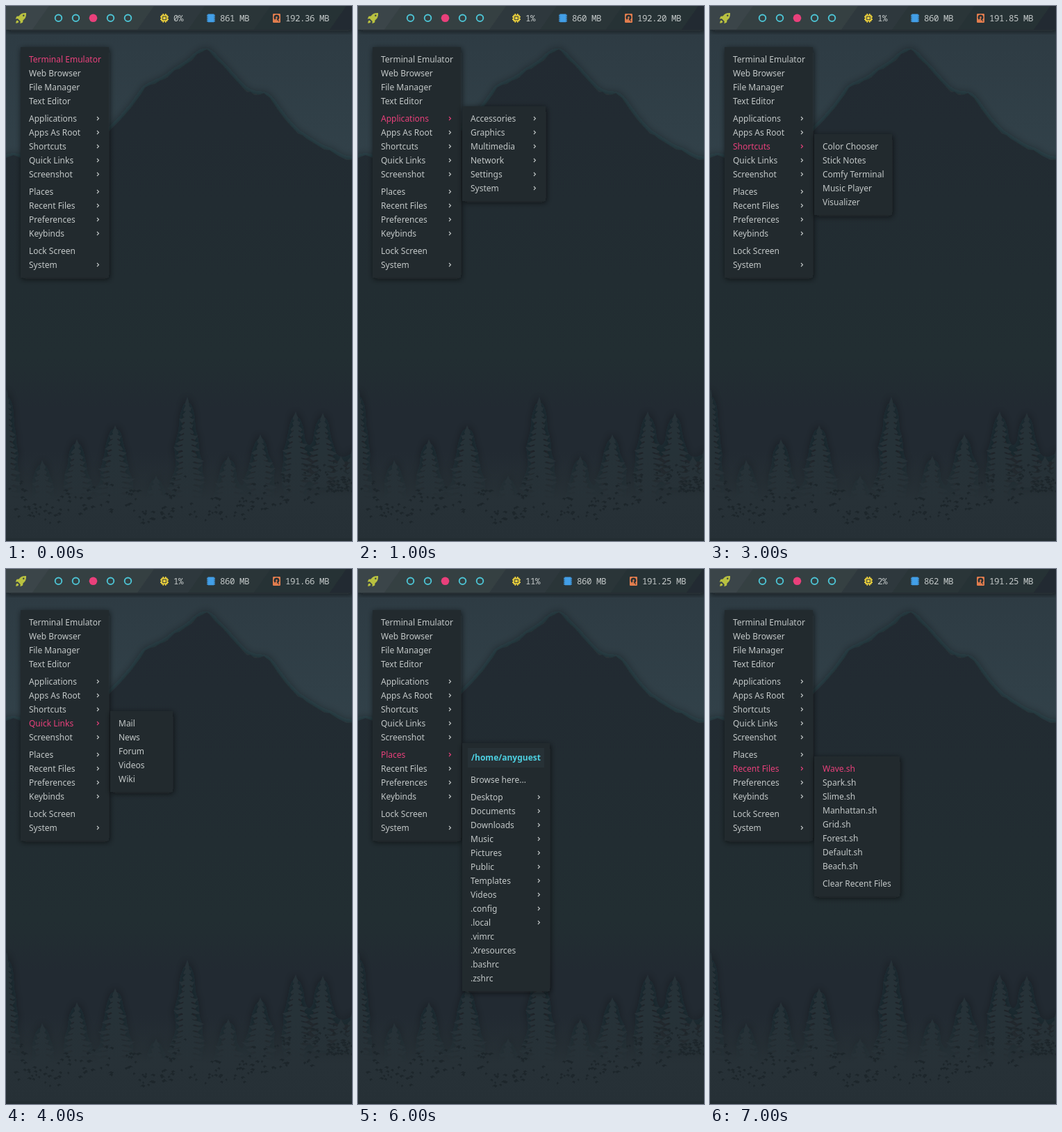
An HTML page for the animation above (8000 ms loop, 498 px wide and 768 px high).

```html
<!DOCTYPE html>
<html lang="en">
<head>
<meta charset="utf-8">
<title>Desktop menu</title>
<style>
  html, body { margin: 0; width: 100%; height: 100%; overflow: hidden; background: #232d32; }
  svg { display: block; }
  text { white-space: pre; }
  .menu { font: 12px "Noto Sans", sans-serif; fill: #c3c8c8; }
  .bar { font: 12.5px "Noto Sans Mono", monospace; letter-spacing: -.5px; fill: #c3c8c8; }
  .head { font: bold 12px "Noto Sans", sans-serif; fill: #4dd0e1; text-anchor: middle; }
</style>
</head>
<body>
<svg id="stage" width="498" height="768" viewBox="0 0 498 768">
  <defs>
    <linearGradient id="sky" x2="0" y2="1">
      <stop offset="0" stop-color="#2d3a42"/><stop offset="1" stop-color="#32424a"/>
    </linearGradient>
    <linearGradient id="rock" x2="0" y2="1">
      <stop offset="0" stop-color="#222c31"/><stop offset=".6" stop-color="#232d32"/>
      <stop offset="1" stop-color="#20292e"/>
    </linearGradient>
    <linearGradient id="ground" x2="0" y2="1">
      <stop offset="0" stop-color="#273137" stop-opacity="0"/>
      <stop offset=".55" stop-color="#273137"/><stop offset="1" stop-color="#263036"/>
    </linearGradient>
    <filter id="soft" x="-20%" y="-20%" width="140%" height="140%">
      <feDropShadow dx="0" dy="0" stdDeviation="7" flood-color="#141b1f" flood-opacity=".6"/>
    </filter>
    <filter id="lift" x="-20%" y="-20%" width="140%" height="140%">
      <feDropShadow dx="1" dy="2" stdDeviation="4" flood-color="#0c1114" flood-opacity=".65"/>
    </filter>
  </defs>
  <rect width="498" height="240" fill="url(#sky)"/>
  <path id="peak" fill="url(#rock)" filter="url(#soft)"/>
  <g id="forest"></g>
  <g id="top"></g>
  <g id="ui"></g>
</svg>
<script>
const PINK = '#e9407b', INK = '#c3c8c8', CYAN = '#4dc5d6';
const $ = id => document.getElementById(id);

let seed = 11;
const rnd = () => (seed = (seed * 16807) % 2147483647) / 2147483647;

const tag = (name, at, body = '') =>
  `<${name} ${Object.entries(at).map(([k, v]) => `${k}="${v}"`).join(' ')}>${body}</${name}>`;
const rect = (x, y, width, height, fill, more) => tag('rect', { x, y, width, height, fill, ...more });
const path = (d, fill, more) => tag('path', { d, fill, ...more });
const text = (x, y, s, cls, fill) =>
  tag('text', { x, y, class: cls, ...(fill && { style: `fill:${fill}` }) }, s);

// ---- Scenery ----
$('peak').setAttribute('d', 'M-30 228L0 218 11 214 21 218 60 226 105 210 148 180 165 163 180 146 ' +
  '194 127 200 117 208 113 214 112 220 108 232 103 243 92 250 90 258 84 268 78 275 69 282 66 ' +
  '289 62 293 65 300 74 312 85 325 100 338 114 347 124 352 123 358 128 366 127 371 125 380 132 ' +
  '390 147 402 163 410 172 420 183 426 185 432 190 445 198 458 206 466 207 478 215 490 221 530 218V800H-30Z');

function tree(x, top, base, w) {
  const n = Math.round((base - top) / 8), step = (base - top) / n;
  const side = s => {
    const pts = [];
    for (let i = 0; i < n; i++) {
      const k = (i + 1) / n, y = top + i * step;
      const r = w * Math.min(1, 1.35 * k ** .75) * (.6 + .45 * rnd()) * (k > .8 ? .85 : 1);
      pts.push([r * .3 + .6, y + 1], [r * .7, y + step * .4], [r, y + step * (.3 + .7 * rnd())],
        [r * .72, y + step * 1.1], [r * .4, y + step * .9]);
    }
    return pts.map(([dx, y]) => `${(x + s * dx).toFixed(1)} ${y.toFixed(1)}`);
  };
  const right = side(1), left = side(-1).reverse();
  return `M${x} ${top - 4}L${right.join(' ')} ${left.join(' ')}Z`;
}

// Gaps between the lower branches
function gaps(x, top, base, w) {
  let d = '';
  for (let i = 0; i < 20; i++) {
    const y = base - (base - top) * .42 * rnd() + 6, a = 3 + 6 * rnd();
    const cx = x + (rnd() * 2 - 1) * w * 1.05, s = cx < x ? -1 : 1;
    d += `M${cx.toFixed(1)} ${y.toFixed(1)}l${(s * a * .5).toFixed(1)} -1.5 ${(s * a * .5).toFixed(1)} 2.5 ` +
      `${(-s * a * .4).toFixed(1)} -.2 ${(-s * a * .3).toFixed(1)} 2Z`;
  }
  return d;
}

const trees = [[1, 554, 735, 24], [52, 656, 738, 22], [102, 626, 724, 25], [157, 606, 722, 30],
  [216, 678, 738, 21], [261, 565, 736, 29], [320, 650, 730, 24], [366, 619, 718, 26],
  [417, 586, 712, 26], [456, 588, 692, 24], [482, 650, 692, 15], [498, 640, 692, 12]];
$('forest').innerHTML =
  tag('g', { filter: 'url(#soft)' }, path(trees.map(a => tree(...a)).join(''), '#273238')) +
  rect(0, 640, 498, 128, 'url(#ground)') +
  path(trees.map(a => gaps(...a)).join(''), '#1d262b') +
  rect(0, 764, 498, 4, '#232d32');

// ---- Top bar ----
const shades = ['#3b4448', '#353f43', '#2f393d', '#2a3438', '#263034', '#222c30'];
const slants = [62, 213, 286, 381, 490];

const rocket = path('M29 10c-5-.3-8 1-10.500 4.500l-3 .3-1.800 3.700 3.300-.2 3.700 3.700-.2 3.300 ' +
  '3.700-1.800.3-3C28 18 29.300 15 29 10ZM16.500 20.500c-2 .5-2 2-2.300 4.200 2.200-.2 3.700-.4 4.300-2.200Z', '#b9c140') +
  tag('circle', { cx: 25.3, cy: 13.7, r: 1.2, fill: shades[0] });

const dots = [75.5, 100.5, 125.5, 150.5, 175.5].map((cx, i) => tag('circle', i === 2
  ? { cx, cy: 17.3, r: 5.8, fill: PINK }
  : { cx, cy: 17.3, r: 4.8, fill: 'none', stroke: CYAN, 'stroke-width': 1.9 })).join('');

const cpu = tag('g', { fill: 'none', stroke: '#f2d43c', 'stroke-width': 1.7 },
  path('M224.300 13.700h7.400v7.400h-7.400ZM226.300 11v2M229.700 11v2M226.300 21.500v2.300M229.700 21.500v2.300' +
    'M222 15.600h2M222 19.200h2M232 15.600h2M232 19.200h2', 'none') + rect(227, 16.400, 2, 2, '#f2d43c'));
const ram = x => path(`M${x + 1.5} 11.500h9v11.800h-9ZM${x} 12.700h12v1.500h-12ZM${x} 15.300h12v1.500h-12Z` +
  `M${x} 18h12v1.500h-12ZM${x} 20.700h12v1.500h-12Z`, '#429fe8');
const disk = (x, bg) => rect(x, 11, 11, 13, '#e27d4e', { rx: 1.3 }) +
  tag('circle', { cx: x + 5.5, cy: 16.3, r: 3.9, fill: bg }) +
  tag('circle', { cx: x + 5.5, cy: 16.3, r: 1.2, fill: '#e27d4e' }) +
  path(`M${x + 5} 17l2 1.500-3.500 4-1.500-1Z`, '#e27d4e') +
  path(`M${x + 6} 18.500l3 3.500`, 'none', { stroke: bg, 'stroke-width': 1.1 });

function topBar([load, mem, free]) {
  const dx = (load.length - 2) * 7;
  const edge = i => slants[i] + (i > 1 ? dx : 0);
  let out = rect(0, 0, 498, 34, shades[5]);
  for (let i = 4; i >= 0; i--) out += path(`M0 0H${edge(i)}L${edge(i) - 24} 34H0Z`, shades[i]);
  return tag('g', { filter: 'url(#lift)' }, out) + rocket + dots + cpu + text(241, 22, load, 'bar') +
    ram(289 + dx) + text(308 + dx, 22, mem + ' MB', 'bar') +
    disk(384 + dx, shades[4]) + text(402 + dx, 22, free + ' MB', 'bar');
}

// ---- Menus: '-' is a gap, '>' marks a submenu ----
const root = ['Terminal Emulator', 'Web Browser', 'File Manager', 'Text Editor', '-', 'Applications>',
  'Apps As Root>', 'Shortcuts>', 'Quick Links>', 'Screenshot>', '-', 'Places>', 'Recent Files>',
  'Preferences>', 'Keybinds>', '-', 'Lock Screen', 'System>'];

const panel = (x, y, w, h) => rect(x, y, w, h, '#21292d', { filter: 'url(#lift)' });

function menu(x, top, w, items, active, y = top + 17) {
  let rows = '';
  for (const item of items) {
    if (item === '-') { y += 5; continue; }
    const label = item.replace('>', ''), fill = label === active ? PINK : INK;
    rows += text(x + 12, y + 5, label, 'menu', fill);
    if (item !== label) {
      rows += path(`M${x + w - 17} ${y - 2}l2.500 2.500-2.500 2.500`, 'none', { stroke: fill, 'stroke-width': 1.1 });
    }
    y += 20;
  }
  return panel(x, top, w, y - 1 - top) + rows;
}

const home = () => menu(150, 250, 126, ['Browse here...', '-', 'Desktop>', 'Documents>', 'Downloads>',
  'Music>', 'Pictures>', 'Public>', 'Templates>', 'Videos>', '.config>', '.local>', '.vimrc',
  '.Xresources', '.bashrc', '.zshrc'], '', 302) +
  rect(158, 257, 110, 28, '#273136') + text(213, 275, '/home/anyguest', 'head');

const sub = (top, w, items, active) => () => menu(150, top, w, items, active);

// Each scene: chosen row, bar readings, submenu
const scenes = [
  ['Terminal Emulator', ['0%', '861', '192.36'], () => ''],
  ['Applications', ['1%', '860', '192.20'], sub(144, 120,
    ['Accessories>', 'Graphics>', 'Multimedia>', 'Network>', 'Settings>', 'System>'])],
  ['Apps As Root', ['1%', '860', '192.04'], sub(164, 167, ['Terminal (termite)', 'File Manager (thunar)',
    'Text Editor (geany)', 'Text Editor Alt (leafpad)', 'File Manager CLI (ranger)', 'Text Editor CLI (vim)'])],
  ['Shortcuts', ['1%', '860', '191.85'], sub(184, 112,
    ['Color Chooser', 'Stick Notes', 'Comfy Terminal', 'Music Player', 'Visualizer'])],
  ['Quick Links', ['1%', '860', '191.66'], sub(204, 90, ['Mail', 'News', 'Forum', 'Videos', 'Wiki'])],
  ['Screenshot', ['1%', '861', '191.47'], sub(224, 134, ['Screenshot Now', 'Screenshot In 5s',
    'Screenshot In 10s', 'Screenshot Area', 'Screenshot Window'])],
  ['Places', ['11%', '860', '191.25'], home],
  ['Recent Files', ['2%', '862', '191.25'], sub(269, 123, ['Wave.sh', 'Spark.sh', 'Slime.sh', 'Manhattan.sh',
    'Grid.sh', 'Forest.sh', 'Default.sh', 'Beach.sh', '-', 'Clear Recent Files'], 'Wave.sh')]
];

let shown = -1;
function draw(ms) {
  const i = Math.floor(ms % 8000 / 1000);
  if (i === shown) return;
  shown = i;
  const [active, stats, extra] = scenes[i];
  $('top').innerHTML = topBar(stats);
  $('ui').innerHTML = menu(21, 59, 127, root, active) + extra();
}

const start = performance.now();
function tick() {
  draw(performance.now() - start);
  requestAnimationFrame(tick);
}
tick();
</script>
</body>
</html>
```
